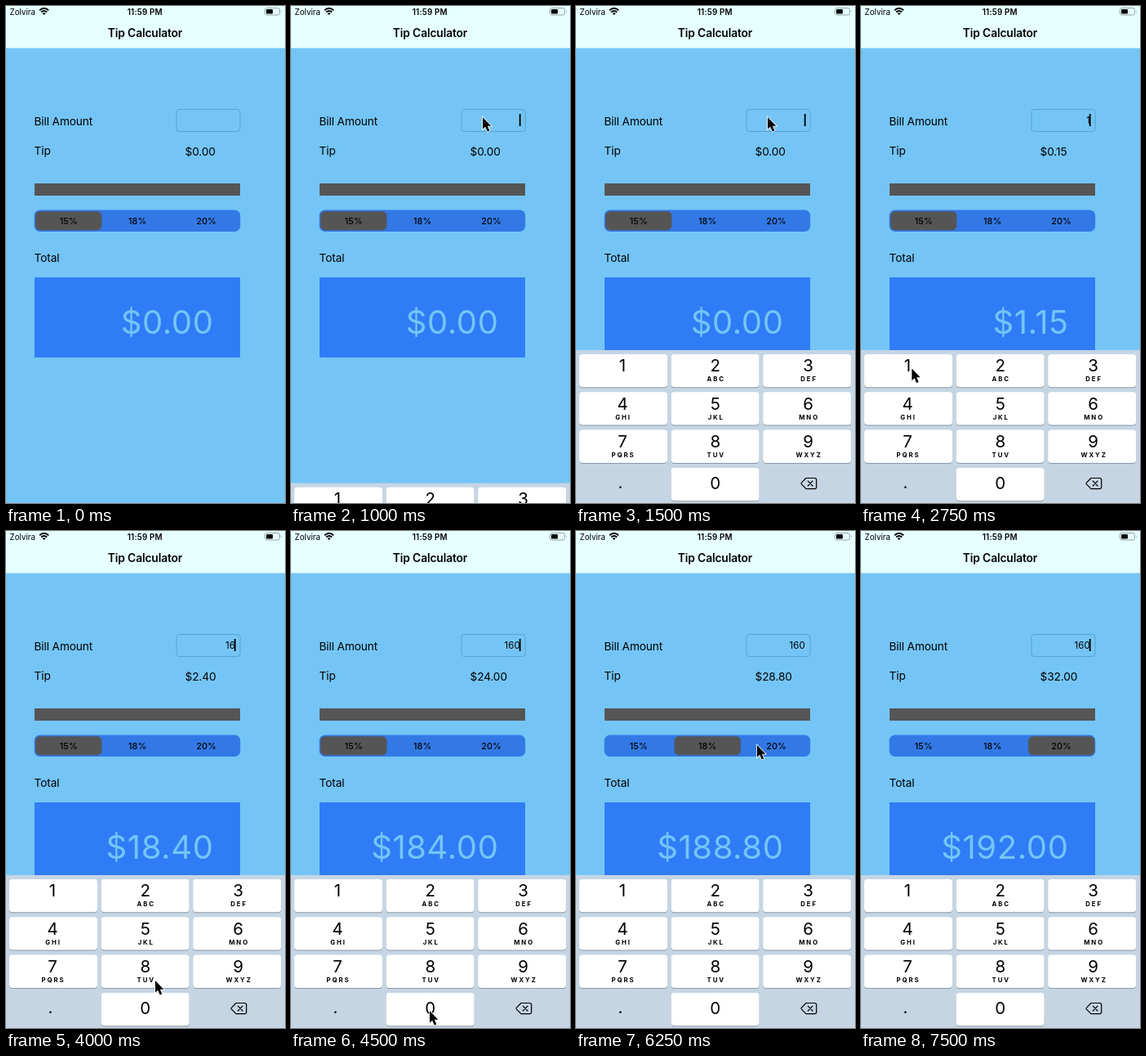
Recreate the animation shown at these times as an HTML page. Size 342 px wide and 608 px high, loop 8 s.

```html
<!DOCTYPE html>
<html lang="en">
<head>
<meta charset="utf-8">
<title>Tip Calculator</title>
<style>
html, body { margin: 0; width: 100%; height: 100%; overflow: hidden; background: #74c5f6; }
svg { display: block; width: 342px; height: 608px; font: 13.7px Inter, "Liberation Sans", sans-serif; letter-spacing: -.13px; }
.mid { text-anchor: middle; }
.end { text-anchor: end; }
.title { font-size: 13.8px; font-weight: 600; }
.status { font-size: 9.8px; letter-spacing: 0; }
.clock { font-weight: 600; letter-spacing: .2px; }
.seg { font-size: 10.8px; font-weight: 500; letter-spacing: .1px; }
.bill { font-size: 11.6px; letter-spacing: .1px; }
.total { font-size: 40px; letter-spacing: .6px; fill: #74c5f6; }
.digit { font-size: 20.5px; letter-spacing: 0; }
.letters { font-size: 7.8px; font-weight: 700; letter-spacing: 1.9px; }
</style>
</head>
<body>
<svg viewBox="0 0 342 608">
  <rect width="342" height="608" fill="#74c5f6"/>
  <rect width="342" height="51.5" fill="#e6ffff"/>
  <text class="status" x="4.5" y="10.5">Zolvira</text>
  <g fill="none" stroke="#000" stroke-width="1.9">
    <path d="M41.2 5.3Q46.7 .3 52.2 5.3M43.2 7.5Q46.7 4.4 50.2 7.5"/>
    <path d="M46.7 11 44.7 9Q46.7 7.3 48.7 9Z" fill="#000" stroke="none"/>
  </g>
  <text class="status clock mid" x="170.3" y="10.5">11:59 PM</text>
  <rect x="317.5" y="2.5" width="18" height="8.5" rx="2.4" fill="none" stroke="#8b9a9a" stroke-width=".9"/>
  <rect x="319" y="4" width="8" height="5.5" rx="1.2"/>
  <path d="M337 5.2q1.6 1.5 0 3z" fill="#8b9a9a"/>
  <text class="title mid" x="170.5" y="38">Tip Calculator</text>

  <text x="34.5" y="146">Bill Amount</text>
  <rect x="209" y="126.5" width="78" height="27" rx="3.5" fill="none" stroke="#5b9dc6" stroke-width=".9"/>
  <text class="bill end" id="bill" x="281" y="144"></text>
  <rect id="caret" x="279.8" y="132" width="1.8" height="15"/>
  <text x="34.5" y="182">Tip</text>
  <text id="tip" x="219.5" y="183"></text>
  <rect x="35" y="217" width="252" height="15" fill="#555"/>

  <rect x="34.7" y="249.5" width="252.5" height="26.5" rx="7" fill="#3379e6"/>
  <rect id="knob" y="251.2" width="81" height="23" rx="5.5" fill="#555" stroke="#4a5f86" stroke-width=".6"/>
  <text class="seg mid" x="76.8" y="267">15%</text>
  <text class="seg mid" x="161.2" y="267">18%</text>
  <text class="seg mid" x="245.6" y="267">20%</text>

  <text x="34.5" y="313">Total</text>
  <rect x="35" y="332" width="252" height="98" fill="#2f7cf6"/>
  <text class="total end" id="total" x="254.5" y="401"></text>

  <g id="pad">
    <rect y="421" width="342" height="188" fill="#c5d5e3"/>
    <g id="keys"></g>
    <text class="digit mid" x="54.5" y="590">.</text>
    <g fill="none" stroke="#000" stroke-width="1.2" stroke-linejoin="round" stroke-linecap="round">
      <path d="M282 577.5H292.5Q294.7 577.5 294.7 579.7V588.5Q294.7 590.7 292.5 590.7H282L276.3 584.8Q275.7 584.1 276.3 583.4Z"/>
      <path d="M284.3 581.2 290 587M290 581.2 284.3 587"/>
    </g>
  </g>
  <path id="cursor" d="M0 0V14.6L3.2 11.7 5.7 17.5 8.3 16.4 5.9 10.7H10.3Z" stroke="#fff" stroke-width="1.6" paint-order="stroke"/>
</svg>
<script>
const $ = id => document.getElementById(id);
const LOOP = 8000, STEP = 250;

// Places the pointer visits: time, x, y
const stops = [
  [250, 300, 78], [750, 235, 136], [1500, 235, 136], [2500, 49, 440], [3500, 262, 497],
  [4000, 183, 550], [4500, 170, 587], [5250, 113, 265], [6250, 222, 262], [7250, 243, 262]
];

// Cubic ease in and out from 0 to 1 between two times
function ease(t, from, to) {
  const p = Math.min(1, Math.max(0, (t - from) / (to - from)));
  return p < .5 ? 4 * p ** 3 : 1 - 4 * (1 - p) ** 3;
}

function pointer(t) {
  let [, x, y] = stops[0];
  for (let i = 1; i < stops.length; i++) {
    const p = ease(t, stops[i - 1][0], stops[i][0]);
    x += (stops[i][1] - stops[i - 1][1]) * p;
    y += (stops[i][2] - stops[i - 1][2]) * p;
  }
  return [x, y];
}

const letters = ["", "ABC", "DEF", "GHI", "JKL", "MNO", "PQRS", "TUV", "WXYZ"];
function key(label, sub, col, row) {
  const x = 4 + col * 112.6, y = 426 + row * 46.3, mid = 57 + col * 113.8;
  return `<rect x="${x}" y="${y + 1}" width="108" height="40.3" rx="4" fill="#8b98a5"/>
    <rect x="${x}" y="${y}" width="108" height="40.3" rx="4" fill="#fff"/>
    <text class="digit mid" x="${mid}" y="${y + (row < 3 ? 21.3 : 26.5)}">${label}</text>
    <text class="letters mid" x="${mid + 1}" y="${y + 33.2}">${sub}</text>`;
}
$("keys").innerHTML = letters.map((s, i) => key(i + 1, s, i % 3, Math.floor(i / 3))).join("") + key(0, "", 1, 3);

const show = (id, on) => $(id).style.display = on ? "" : "none";
const move = (id, x, y) => $(id).setAttribute("transform", `translate(${x} ${y})`);
const money = v => "$" + v.toFixed(2);

function draw(t) {
  // One digit a second is typed from 2500 ms
  const bill = "160".slice(0, Math.max(0, Math.floor((t - 1500) / 1000)));
  const rate = t < 5750 ? 15 : t < 6750 ? 18 : 20;
  const tip = bill * rate / 100;
  $("bill").textContent = bill;
  $("tip").textContent = money(tip);
  $("total").textContent = money(+bill + tip);
  $("knob").setAttribute("x", 36.2 + 84.5 * (ease(t, 5500, 6000) + ease(t, 6500, 7000)));
  move("pad", 0, 191 * (1 - ease(t, 750, 1500)));

  // The caret stays lit just after a tap or a keystroke
  const held = t < 1500 || (t >= 4000 && t < 4500);
  show("caret", t >= 1000 && (held || t % 1000 >= 500));
  show("cursor", t >= 250 && t < 7500);
  move("cursor", ...pointer(t));
}

function frame() {
  const t = performance.now() % LOOP;
  draw(Math.floor(t / STEP) * STEP);
  requestAnimationFrame(frame);
}
frame();
</script>
</body>
</html>
```
